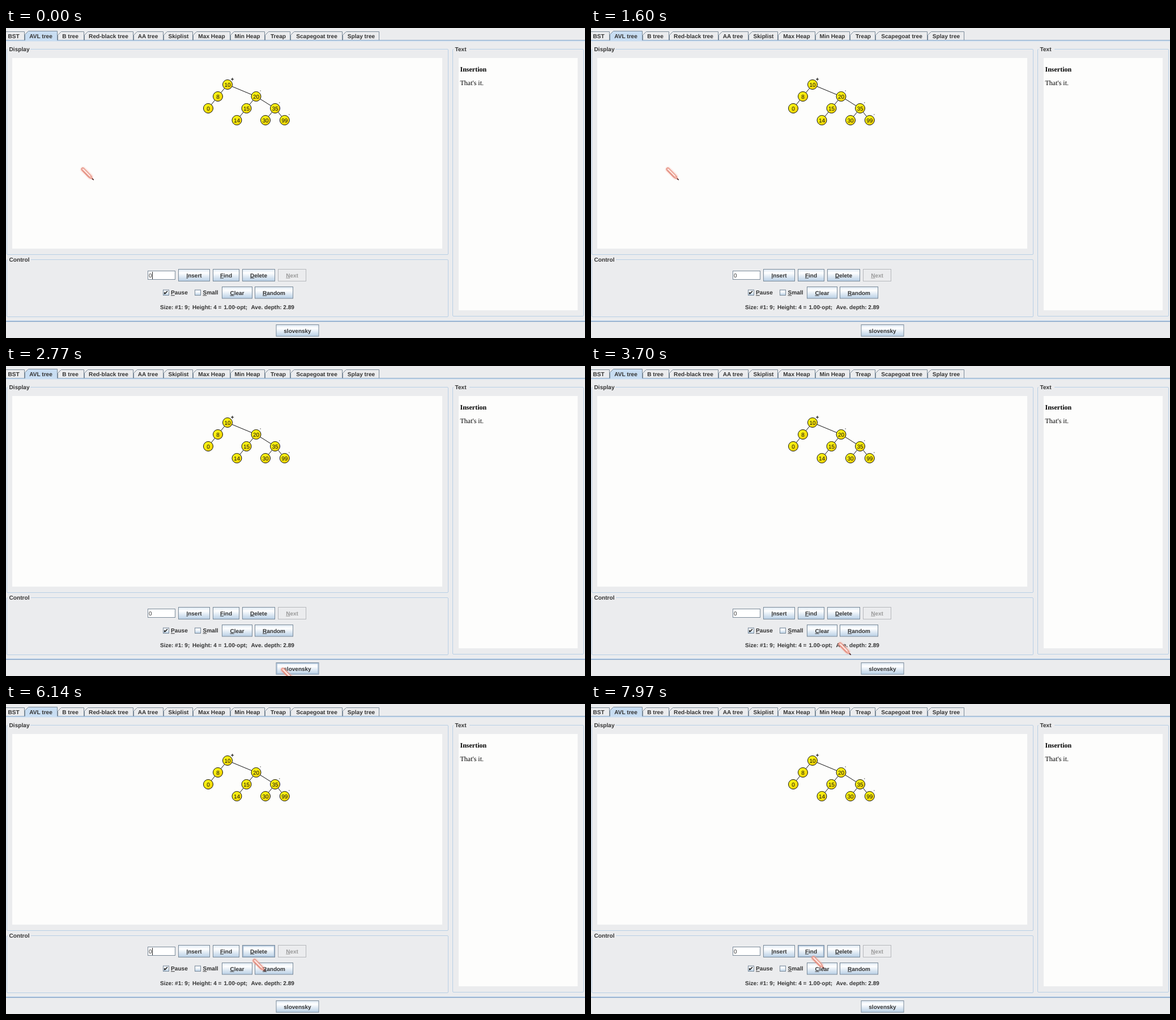
Animation of 1022x548 px, one loop 8000 ms. Source, as an HTML page:

```html
<!DOCTYPE html>
<html lang="en">
<head>
<meta charset="utf-8">
<title>Tree visualiser</title>
<style>
html, body { margin: 0; width: 100%; height: 100%; overflow: hidden; background: #ebecee; }
svg { display: block; width: 100vw; height: 100vh; }
text { font: bold 10px "Liberation Sans", Arial, sans-serif; fill: #333; white-space: pre; text-rendering: geometricPrecision; }
.tab { font-size: 10.15px; }
.plain { font-weight: normal; }
.key { font-weight: normal; fill: #111; }
.mid { text-anchor: middle; }
.serif { font: 12px "Liberation Serif", "Times New Roman", serif; fill: #000; }
.off { fill: #999; }
.mn { text-decoration: underline; }
</style>
</head>
<body>
<svg id="stage" viewBox="0 0 1022 548" preserveAspectRatio="none" xmlns="http://www.w3.org/2000/svg">
  <defs>
    <linearGradient id="face" x2="0" y2="1">
      <stop offset="0" stop-color="#dde8f3"/>
      <stop offset=".3" stop-color="#fff"/>
      <stop offset=".45" stop-color="#f0f5fa"/>
      <stop offset="1" stop-color="#b8cfe5"/>
    </linearGradient>
    <linearGradient id="gold" x2="1" y2="1">
      <stop offset="0" stop-color="#ffff1a"/>
      <stop offset="1" stop-color="#f0cc00"/>
    </linearGradient>
    <filter id="soft" x="-50%" y="-50%" width="200%" height="200%"><feGaussianBlur stdDeviation="1"/></filter>
  </defs>
  <g id="ui"></g>
  <path id="caret" d="M258.5 431V444" stroke="#222"/>
  <g id="pencil" stroke-linecap="round" fill="none">
    <path d="M4 4L17 17" stroke="#f2a090" stroke-width="8" opacity=".6" filter="url(#soft)"/>
    <path d="M1.2 4.5Q0 1 4.5 1L17.5 14.5L22 22L14 18Z" fill="#f3b9ae" stroke="#de8071"/>
    <path d="M4.5 3.8L16 15.4" stroke="#fdeae5" stroke-width="1.8"/>
    <path d="M3 5.5L15 17.5" stroke="#d9705f" stroke-width=".8"/>
    <path d="M20.6 20.6L22.2 22.2" stroke="#533" stroke-width="1.8"/>
  </g>
</svg>
<script>
const LOOP = 8000, BLINK = 510;
const EDGE = "#7a8a99", SKY = "#b8cfe5", TAB = "#c8ddf2";
const $ = id => document.getElementById(id);
let out = "";

const rect = (x, y, w, h, fill, stroke = "none", more = "") =>
  out += `<rect x="${x}" y="${y}" width="${w}" height="${h}" fill="${fill}" stroke="${stroke}" ${more}/>`;
const path = (d, stroke, fill = "none", width = 1) =>
  out += `<path d="${d}" stroke="${stroke}" fill="${fill}" stroke-width="${width}"/>`;
const text = (x, y, s, cls = "") => out += `<text x="${x}" y="${y}" class="${cls}">${s}</text>`;
const mnemonic = s => `<tspan class="mn">${s[0]}</tspan>${s.slice(1)}`;

// Tabs: label, left edge, right edge, label centre
const tabs = [
  ["BST", -7, 33, 13.5], ["AVL tree", 33, 91, 61.5], ["B tree", 91, 138, 113.5],
  ["Red-black tree", 138, 225, 181], ["AA tree", 225, 278, 250.5], ["Skiplist", 278, 330, 304.5],
  ["Max Heap", 330, 396, 363], ["Min Heap", 396, 457, 426], ["Treap", 457, 502, 480.5],
  ["Scapegoat tree", 502, 594, 548.5], ["Splay tree", 594, 659, 627]
];
rect(0, 22, 1022, 1.5, TAB);
path("M0 21.7H1022", "#86a5c6");
tabs.forEach(([label, l, r, mid], i) => {
  const on = i === 1, top = on ? 5.5 : 6.5;
  path(`M${l + .5} 21.5V${top + 6}L${l + 6.5} ${top}H${r - .5}V21.5`, EDGE, on ? TAB : "none");
  if (on) rect(l + 1, 21, r - l - 2, 2, TAB);
  text(mid, 17.7, label, "tab mid");
});

// Titled panels
function panel(title, x, y, w, h, gap) {
  rect(x + .5, y + .5, w, h, "none", SKY, 'rx="1.5"');
  rect(x + 2, y, gap, 1, "#ebecee");
  text(x + 4.5, y + 3.5, title, "tab");
}
panel("Display", 1, 37, 779, 363, 40);
panel("Control", 1, 409, 779, 101, 41);
panel("Text", 788, 37, 231, 472, 28);
rect(11, 53, 759, 337, "#fdfdfc");
rect(799, 53, 210, 446, "#fdfdfc");
text(801.5, 76.7, '<tspan font-weight="bold">Insertion</tspan>', "serif");
text(801.5, 101, "That's it.", "serif");
rect(0, 517, 1022, 1, TAB);
rect(0, 518, 1022, 1.3, "#7f9fc4");

// Tree: key, x, y, parent index
const nodes = [
  ["10", 391, 100], ["8", 374, 121, 0], ["0", 357, 142, 1], ["20", 441.5, 121, 0], ["15", 424.5, 142, 3],
  ["35", 475, 142, 3], ["14", 407.5, 163, 4], ["30", 458, 163, 5], ["99", 491.8, 163, 5]
];
for (const [, x, y, p] of nodes)
  if (p !== undefined) path(`M${x} ${y}L${nodes[p][1]} ${nodes[p][2]}`, "#111");
for (const [key, x, y] of nodes) {
  out += `<circle cx="${x}" cy="${y}" r="8.5" fill="url(#gold)" stroke="#111"/>`;
  text(x, y + 3.7, key, "key mid");
}
path("M397 90.5H402M399.5 88V93", "#111");
for (const [x, y] of [[448.5, 110.5], [482, 131.5], [499, 152.5]]) rect(x, y, 1.4, 1, "#333");

// Controls
const buttons = [
  ["Insert", 304, 426, 56, 22], ["Find", 365, 426, 47, 22], ["Delete", 417, 426, 58, 22],
  ["Clear", 381, 457, 54, 21.5], ["Random", 439, 457, 68, 21.5], ["slovensky", 476.5, 524, 76, 21.5]
];
buttons.forEach(([label, x, y, w, h], i) => {
  rect(x + .5, y + .5, w - 1, h - 1, "url(#face)", EDGE);
  rect(x + 1.6, y + 1.6, w - 3.2, h - 3.2, "none", "#a3bbd4", `id="hover${i}" stroke-width="1.4"`);
  text(x + w / 2, y + 14.6, label === "slovensky" ? label : mnemonic(label), "mid");
});
rect(480.5, 426.5, 49, 21, "#ebecee", "#b5b8bc");
text(505, 440.6, mnemonic("Next"), "mid off");
rect(250.5, 429.5, 48, 15, "#fff", EDGE);
text(252, 441, "0", "plain");
for (const [label, x, tx] of [["Pause", 277, 291], ["Small", 333, 347.5]]) {
  rect(x + .5, 463, 10, 9.5, "url(#face)", EDGE);
  text(tx, 471.3, mnemonic(label), "tab");
}
path("M279.8 467V470.5M280.3 470L285 465", "#222", "none", 1.6);
for (const [x, s] of [[272, "Size: #1: 9;"], [329, "Height: 4 ="], [384.5, "1.00·opt;"], [432.5, "Ave. depth: 2.89"]])
  text(x, 497, s);
$("ui").innerHTML = out;

// Pencil stops: time, x, y
const stops = [
  [0, 132, 246], [1640, 132, 246], [2650, 485, 533], [3180, 485, 533], [4200, 390, 446],
  [5300, 390, 446], [5850, 450, 452], [6140, 434.5, 450], [6500, 455, 459], [6950, 449, 452],
  [7750, 389, 445], [LOOP, 389, 445]
];
function pencilAt(t) {
  const i = stops.findIndex(s => s[0] > t);
  const [t0, x0, y0] = stops[i - 1], [t1, x1, y1] = stops[i];
  const k = (t - t0) / (t1 - t0), e = k * k * (3 - 2 * k);
  return [Math.round(x0 + (x1 - x0) * e), Math.round(y0 + (y1 - y0) * e)];
}

const pencil = $("pencil"), caret = $("caret");
const rims = buttons.map((b, i) => $("hover" + i));
const show = (el, on) => el.setAttribute("visibility", on ? "visible" : "hidden");

function draw(t) {
  const [px, py] = pencilAt(t);
  pencil.setAttribute("transform", `translate(${px} ${py})`);
  show(caret, Math.floor(t / BLINK) % 2 === 0);
  buttons.forEach(([, x, y, w, h], i) =>
    show(rims[i], px >= x && px < x + w && py - 5 >= y && py - 5 < y + h));
}

const start = performance.now();
function tick(now) {
  draw(Math.max(0, now - start) % LOOP);
  requestAnimationFrame(tick);
}
draw(0);
requestAnimationFrame(tick);
</script>
</body>
</html>
```
